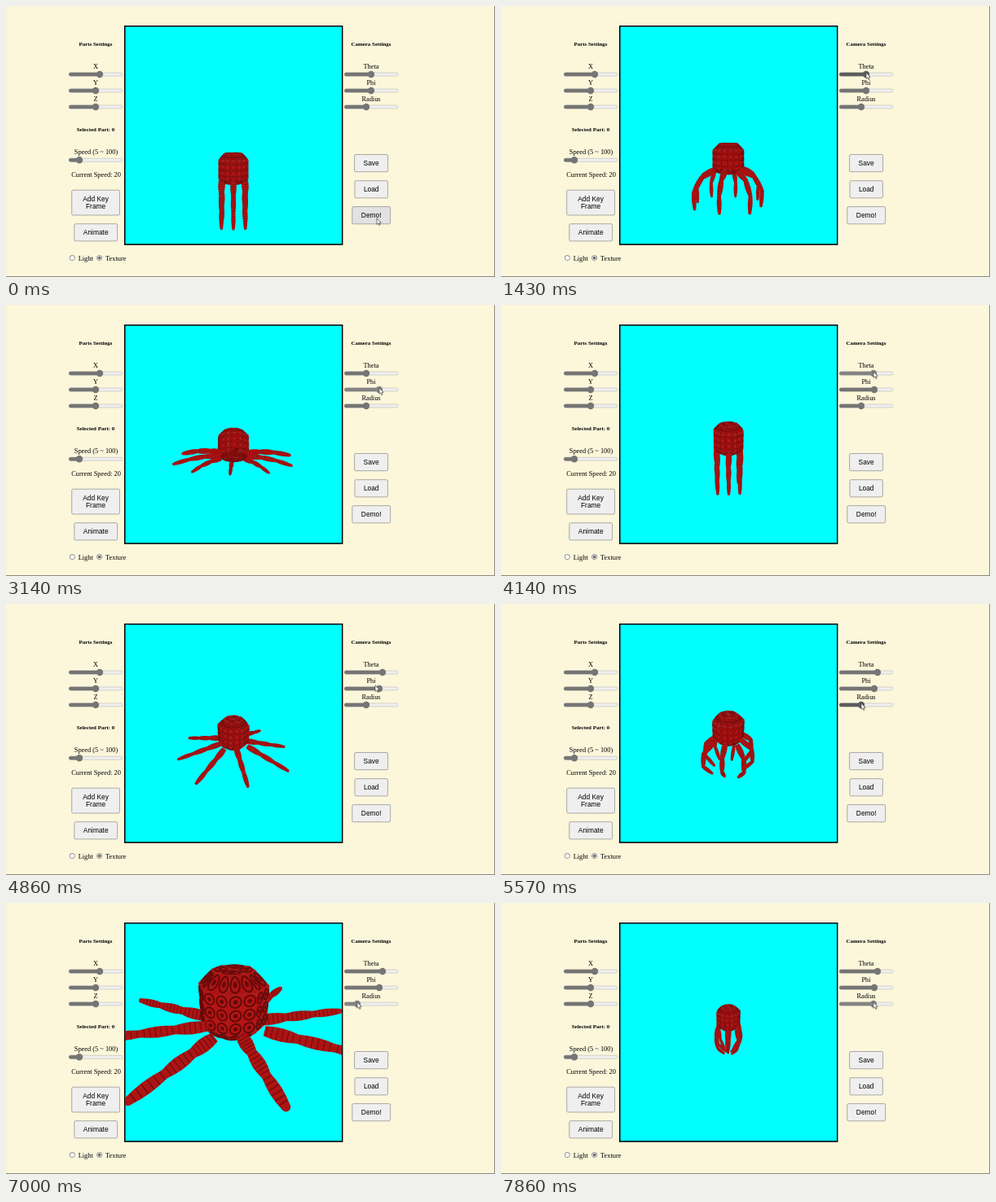
These frames come from a looping animation (600x333 px, 8 s). An HTML page with a canvas:

```html
<!DOCTYPE html>
<html lang="en">
<head>
<meta charset="utf-8">
<title>Octopus demo</title>
<style>
html, body { margin: 0; width: 100%; height: 100%; overflow: hidden; background: #fcf6db; }
canvas { display: block; }
</style>
</head>
<body>
<canvas id="stage" width="600" height="333"></canvas>
<script>
const ctx = document.getElementById('stage').getContext('2d');
const LOOP = 8000, STEP = 1000 / 7, CYCLE = 2000;
const FOCAL = 320, CX = 279, CY = 159, RAD = Math.PI / 180;
const SERIF = '"Liberation Serif", "Times New Roman", serif';
const SANS = '"Liberation Sans", Arial, sans-serif';

const ramp = (t, from, to) => Math.min(1, Math.max(0, (t - from) / (to - from)));
const lerp = (a, b, k) => a + (b - a) * k;
const mix = (a, b, k) => a.map((v, i) => lerp(v, b[i], k));
const bend = (d, below, above) => d * (d < 0 ? below : above);

// Thumb positions of the camera sliders
const theta = t => 448 - 6 * ramp(t, 1500, 2200) + 20 * ramp(t, 3570, 4330);
const phi = t => 448 + 10 * ramp(t, 2500, 3100);
const radius = t => 442 - 11 * ramp(t, 5860, 6600) + 26 * ramp(t, 7000, 7860);

const cameraSliders = [
  { name: 'Theta', y: 84, thumb: theta },
  { name: 'Phi', y: 104, thumb: phi },
  { name: 'Radius', y: 124, thumb: radius }
];

// Places the pointer rests on or drags, in order
const stops = [
  { y: 263, thumb: () => 455, enter: 0, press: 0, leave: 430 },
  { y: 84, thumb: theta, enter: 1100, press: 1500, leave: 2200 },
  { y: 104, thumb: phi, enter: 2450, press: 2500, leave: 3200 },
  { y: 84, thumb: theta, enter: 3500, press: 3570, leave: 4330 },
  { y: 124, thumb: radius, enter: 5500, press: 5860, leave: LOOP }
];

function pointerAt(t) {
  const i = stops.findIndex(s => t <= s.leave), stop = stops[i];
  const tip = (s, when) => [s.thumb(when), s.y - 2];
  if (t >= stop.enter) return { tip: tip(stop, t), stop };
  const last = stops[i - 1];
  const k = ramp(t, last.leave, stop.enter);
  return { tip: mix(tip(last, last.leave), tip(stop, stop.enter), k) };
}

// One stroke: legs hang, open sideways, then drop while curling inward
function swimPose(t) {
  const phase = (t % CYCLE) / CYCLE;
  const closing = ramp(phase, 0.5, 1);
  const drop = 90 * (phase < 0.5 ? 1 - ramp(phase, 0.1, 0.5) : closing ** 1.5);
  const curl = 95 * Math.sin(Math.PI * closing ** 1.6);
  return {
    joints: [0, 0.5, 1].map(k => (drop + curl * k) * RAD),
    yaw: 13 * (1 - drop / 90) - 24 * Math.sin(Math.PI * closing)
  };
}

// y points down, z points toward the viewer
function makeCamera(t) {
  const tilt = bend(theta(t) - 448, 3, 1.95) * RAD;
  const distance = FOCAL + bend(radius(t) - 442, 15, 7.2);
  const c = Math.cos(tilt), s = Math.sin(tilt);
  return ([x, y, z]) => {
    const k = FOCAL / (distance - z * c + y * s);
    return { x: CX + x * k, y: CY + (y * c + z * s) * k, k };
  };
}

function tracePath(points) {
  ctx.beginPath();
  points.forEach((p, i) => i ? ctx.lineTo(p.x, p.y) : ctx.moveTo(p.x, p.y));
  ctx.closePath();
}

function polar(r, angle, y) {
  return [r * Math.sin(angle), y, r * Math.cos(angle)];
}

function facesViewer(points) {
  return points.reduce((sum, p, i) => {
    const q = points[(i + 1) % points.length];
    return sum + p.x * q.y - q.x * p.y;
  }, 0) > 0;
}

// Quad covered with a grid of dark rings
function drawFace([a, b, c, d], project, shade, cols, rows) {
  const flat = [a, b, c, d].map(project);
  if (!facesViewer(flat)) return;
  const k = flat[0].k;
  ctx.fillStyle = ctx.strokeStyle = `rgb(${180 * shade}, ${20 * shade}, ${20 * shade})`;
  ctx.lineWidth = 0.4;
  tracePath(flat);
  ctx.fill();
  ctx.stroke();
  const spot = (u, v) => project(mix(mix(a, b, u), mix(d, c, u), v));
  const ring = (i, j, r) => Array.from({ length: 12 }, (_, n) => {
    const w = n * Math.PI / 6;
    return spot((i + 0.5 + r * Math.cos(w)) / cols, (j + 0.5 + r * Math.sin(w)) / rows);
  });
  ctx.strokeStyle = ctx.fillStyle = '#640909';
  ctx.lineWidth = 0.8 * k;
  for (let i = 0; i < cols; i++) {
    for (let j = 0; j < rows; j++) {
      tracePath(ring(i, j, 0.4));
      ctx.stroke();
      tracePath(ring(i, j, 0.16));
      ctx.fill();
    }
  }
}

function drawBody(y, yaw, project) {
  const levels = [[11.5, -19], [19.3, -11], [19.3, 11], [12, 17.5]];
  const corner = (l, i) => polar(levels[l][0], yaw + (i + 0.5) * 45 * RAD, y + levels[l][1]);
  for (let i = 0; i < 8; i += 2) {
    const cap = l => [[0, y + levels[l][1], 0], corner(l, i), corner(l, i + 1), corner(l, i + 2)];
    drawFace(cap(0).reverse(), project, 0.95, 1, 1);
    drawFace(cap(3), project, 0.8, 1, 1);
  }
  for (let i = 0; i < 8; i++) {
    for (let l = 0; l < 3; l++) {
      const quad = [corner(l, i), corner(l, i + 1), corner(l + 1, i + 1), corner(l + 1, i)];
      drawFace(quad, project, [0.96, 1, 0.85][l], 2, l === 1 ? 3 : 1);
    }
  }
}

function drawSegment(p, q, wide, narrow) {
  const dx = q.x - p.x, dy = q.y - p.y, len = Math.hypot(dx, dy) || 1;
  const edge = (u, side) => {
    const bulge = 0.74 + 0.3 * Math.sin(Math.PI * u);
    const w = side * lerp(wide, narrow, u) * bulge * lerp(p.k, q.k, u) / len;
    return { x: p.x + dx * u - dy * w, y: p.y + dy * u + dx * w };
  };
  const cuts = [0, 0.25, 0.5, 0.75, 1];
  ctx.fillStyle = '#ad1414';
  tracePath([...cuts.map(u => edge(u, 1)), ...cuts.map(u => edge(1 - u, -1))]);
  ctx.fill();
  ctx.beginPath();
  ctx.arc(q.x, q.y, narrow * 0.74 * q.k, 0, 7);
  ctx.fill();
  ctx.strokeStyle = 'rgba(75, 5, 5, .55)';
  ctx.lineWidth = 0.55 * p.k;
  ctx.beginPath();
  for (let u = 0.06; u < 1; u += 0.16) {
    const a = edge(u, 0.9), b = edge(u, -0.9);
    ctx.moveTo(a.x, a.y);
    ctx.lineTo(b.x, b.y);
  }
  ctx.stroke();
}

function drawLeg({ points }) {
  const width = i => 3.7 - 0.5 * i;
  for (let i = 0; i < 3; i++) drawSegment(points[i], points[i + 1], width(i), width(i + 1));
}

function drawOctopus(t) {
  const pose = swimPose(t), project = makeCamera(t);
  const y = 41 - 0.0085 * t;
  const yaw = (pose.yaw - 8.8 * (phi(t) - 448)) * RAD;
  const legs = Array.from({ length: 8 }, (_, i) => {
    const angle = yaw + i * 45 * RAD;
    let r = i % 2 ? 19.8 : 15, h = y + 12.5;
    const points = [project(polar(r, angle, h))];
    for (const joint of pose.joints) {
      r += 18.7 * Math.cos(joint);
      h += 18.7 * Math.sin(joint);
      points.push(project(polar(r, angle, h)));
    }
    return { points, near: Math.cos(angle) };
  }).sort((a, b) => a.near - b.near);
  legs.filter(leg => leg.near < 0.05).forEach(drawLeg);
  drawBody(y, yaw, project);
  legs.filter(leg => leg.near >= 0.05).forEach(drawLeg);
}

function label(text, x, y, font = `8.35px ${SERIF}`, align = 'center') {
  ctx.font = font;
  ctx.textAlign = align;
  ctx.fillStyle = '#000';
  ctx.fillText(text, x, y);
}

function heading(text, x, y) {
  label(text, x, y, `bold 6.93px ${SERIF}`);
}

function box(x, y, w, h, r, fill, stroke) {
  ctx.beginPath();
  ctx.roundRect(x, y, w, h, r);
  ctx.fillStyle = fill;
  ctx.fill();
  ctx.strokeStyle = stroke;
  ctx.lineWidth = 0.6;
  ctx.stroke();
}

function disc(x, y, r, fill) {
  ctx.beginPath();
  ctx.arc(x, y, r, 0, 7);
  ctx.fillStyle = fill;
  ctx.fill();
}

function slider(x, y, thumb, tone = '#757575') {
  box(x + 0.3, y - 2, 65.7, 4, 2, '#efefef', '#bdbdb6');
  box(x + 0.3, y - 2, thumb - x, 4, 2, tone, tone);
  disc(thumb, y, 4.2, tone);
}

function button(lines, x, y, w, h, fill = '#efefef') {
  box(x, y, w, h, 1.6, fill, '#777');
  lines.forEach((line, i) => {
    const shift = (i - (lines.length - 1) / 2) * 9.4;
    label(line, x + w / 2, y + h / 2 + 3 + shift, `8.4px ${SANS}`);
  });
}

function radio(text, x, on) {
  const y = 309.6;
  disc(x, y, 3.3, '#767676');
  disc(x, y, 2.6, '#fff');
  if (on) disc(x, y, 1.9, '#6a6a6a');
  label(text, x + 7.4, y + 3.4, undefined, 'left');
}

function drawPanels(t, stop) {
  heading('Parts Settings', 110, 48.5);
  heading('Camera Settings', 448, 48.5);
  heading('Selected Part: 0', 110, 154);
  ['X', 'Y', 'Z'].forEach((name, i) => {
    label(name, 110, 77 + i * 20);
    slider(77, 84 + i * 20, i ? 110 : 115);
  });
  cameraSliders.forEach(({ name, y, thumb }) => {
    const hovered = stop && stop.thumb === thumb;
    const tone = hovered ? (t < stop.press ? '#5c5c5c' : '#838383') : undefined;
    label(name, 448, y - 7);
    slider(415, y, thumb(t), tone);
  });
  label('Speed (5 ~ 100)', 110.5, 182);
  slider(77, 189.3, 90);
  label('Current Speed: 20', 110.5, 210.3);
  button(['Add Key', 'Frame'], 80.7, 226.2, 58.8, 30.8);
  button(['Animate'], 83.8, 267.7, 52.8, 21.2);
  button(['Save'], 427.6, 182.5, 41, 21.2);
  button(['Load'], 428, 214.7, 40.4, 21.2);
  button(['Demo!'], 424.8, 246.6, 46.8, 21.2, stop === stops[0] ? '#e2e2e2' : undefined);
  radio('Light', 81.3, false);
  radio('Texture', 114.6, true);
}

function drawPointer([x, y]) {
  const shape = [[0, 0], [0, 7.4], [1.7, 5.9], [2.9, 8.5], [4.1, 8], [2.9, 5.4], [5.2, 5.3]];
  tracePath(shape.map(([dx, dy]) => ({ x: x + dx, y: y + dy })));
  ctx.fillStyle = '#fff';
  ctx.fill();
  ctx.strokeStyle = '#222';
  ctx.lineWidth = 0.6;
  ctx.stroke();
}

function drawScene(t) {
  const view = [146.3, 25.3, 265.8, 267.2];
  ctx.fillStyle = '#000';
  ctx.fillRect(145, 24, 268.4, 269.8);
  ctx.save();
  ctx.beginPath();
  ctx.rect(...view);
  ctx.clip();
  ctx.fillStyle = '#0ff';
  ctx.fillRect(...view);
  ctx.lineJoin = 'round';
  drawOctopus(t);
  ctx.restore();
}

function render(t) {
  const { tip, stop } = pointerAt(t);
  ctx.fillStyle = '#fcf6db';
  ctx.fillRect(0, 0, 600, 333);
  ctx.fillStyle = '#8c8a80';
  ctx.fillRect(599, 0, 1, 333);
  ctx.fillRect(0, 332, 600, 1);
  drawScene(t);
  drawPanels(t, stop);
  drawPointer(tip);
}

const start = performance.now();
function tick() {
  const t = (performance.now() - start) % LOOP;
  render(Math.floor(t / STEP + 0.03) * STEP % LOOP);
  requestAnimationFrame(tick);
}
tick();
</script>
</body>
</html>
```
